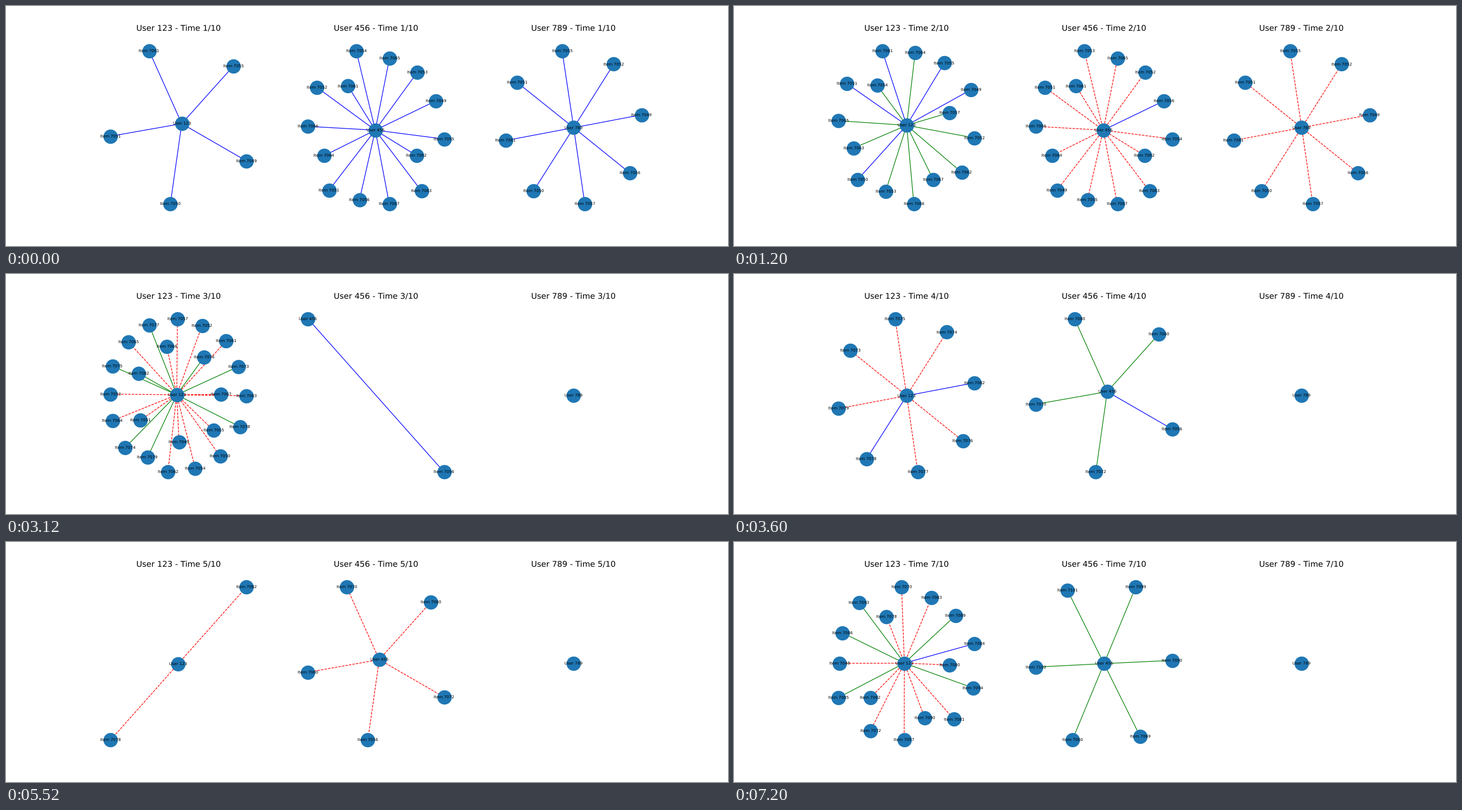
A matplotlib script that plays this animation: 1280x427 px, repeating every 8 s.

```python
from functools import lru_cache

import numpy as np
import matplotlib.pyplot as plt
from matplotlib.animation import FuncAnimation

DPI = 64
PT = 4 / 3                      # line and font scale at this dpi
HOLD = 3                        # animation frames per time step
PAD = 0.105                     # space around the unit square of nodes

# Item numbers above 7000 per time step, counter-clockwise from the rightmost;
# a minus marks an item dropped at that step
HISTORY = {
    123: ["49 55 61 51 50",
          "52 57 49 55 64 61 54 51 65 63 50 53 66 67 62",
          "-63 -67 73 -61 76 -52 -57 -66 77 -65 82 75 "
          "-53 -64 -51 74 79 -62 -49 -54 -50 -55 78",
          "82 -74 -75 -73 -79 78 -77 -76",
          "-82 -78",
          "83 72 81 82 84 80 70 78 48 90 57",
          "84 89 -83 -70 -78 93 86 -48 85 -82 -72 -57 -90 -81 94 -80"],
    456: ["55 49 53 65 54 61 52 66 64 51 56 67 63 62",
          "-54 56 -52 -65 -53 -61 -51 -66 -64 -49 -55 -67 -63 -62",
          "56",
          "56 60 80 70 72",
          "-72 -80 -70 -60 -56",
          "",
          "90 99 101 102 60 69"],
    789: ["49 52 55 51 61 50 57 56",
          "-49 -52 -55 -51 -61 -50 -57 -56",
          "", "", "", "", ""],
}


def relax(n, rounds=50):
    """Force-directed layout of a hub (first) and its n items."""
    pos = np.random.RandomState(42).rand(n + 1, 2)
    links = np.zeros((n + 1, n + 1))
    links[0, 1:] = links[1:, 0] = 1
    k = np.sqrt(1 / (n + 1))
    heat = 0.1 * np.ptp(pos, axis=0).max()
    cooling = heat / (rounds + 1)
    for _ in range(rounds):
        delta = pos[:, None] - pos[None]
        dist = np.maximum(np.linalg.norm(delta, axis=-1), 0.01)
        force = k * k / dist**2 - links * dist / k
        push = np.einsum("ijk,ij->ik", delta, force)
        size = np.linalg.norm(push, axis=1)
        size = np.where(size < 0.01, 0.1, size)
        move = push * (heat / size)[:, None]
        pos += move
        heat -= cooling
        if np.linalg.norm(move) / (n + 1) < 1e-4:
            break
    return pos


@lru_cache(maxsize=None)
def layout(n):
    """Hub and items in the unit square, items sorted around the hub."""
    if n == 0:
        return np.array([[0.5, 0.5]])
    pos = relax(n)
    pos = (pos - pos.min(axis=0)) / np.ptp(pos, axis=0)
    hub, items = pos[0], pos[1:]
    dx, dy = (items - hub).T
    angle = np.arctan2(dy, dx)
    first = angle[items[:, 0].argmax()]
    order = np.argsort((angle - first) % (2 * np.pi))
    return np.vstack([hub, items[order]])


def edge_style(item, before):
    if item.startswith("-"):
        return dict(color="red", ls="--")
    return dict(color="blue" if item in before else "green", ls="-")


def draw_graph(ax, user, step):
    ax.clear()
    ax.axis("off")
    ax.set(xlim=(-PAD, 1 + PAD), ylim=(-PAD, 1 + PAD))
    ax.set_title(f"User {user} - Time {step + 1}/10",
                 fontsize=12 * PT, pad=6 * PT)

    items = HISTORY[user][step].split()
    before = HISTORY[user][max(step - 1, 0)].split()
    pts = layout(len(items))
    for item, p in zip(items, pts[1:]):
        ax.plot(*zip(pts[0], p), lw=PT, zorder=1, **edge_style(item, before))
    ax.scatter(*pts.T, s=400 * PT**2, c="#1f77b4",
               linewidths=1.5 * PT, zorder=2)

    names = [f"User {user}"]
    names += [f"Item {7000 + abs(int(i))}" for i in items]
    for name, (x, y) in zip(names, pts):
        ax.text(x, y, name, fontsize=6 * PT, ha="center", va="center", zorder=3)


def update(frame):
    for ax, user in zip(axes, HISTORY):
        draw_graph(ax, user, frame // HOLD)
    return []


plt.rcParams["font.family"] = "DejaVu Sans"
plt.rcParams["text.hinting"] = "none"
fig, axes = plt.subplots(1, 3, figsize=(1280 / DPI, 427 / DPI), dpi=DPI)
fig.subplots_adjust(left=0.125, right=0.9, bottom=0.108, top=0.88, wspace=0.2)
anim = FuncAnimation(fig, update, frames=20, interval=400,
                     init_func=lambda: update(0), repeat=True)
plt.show()
```
